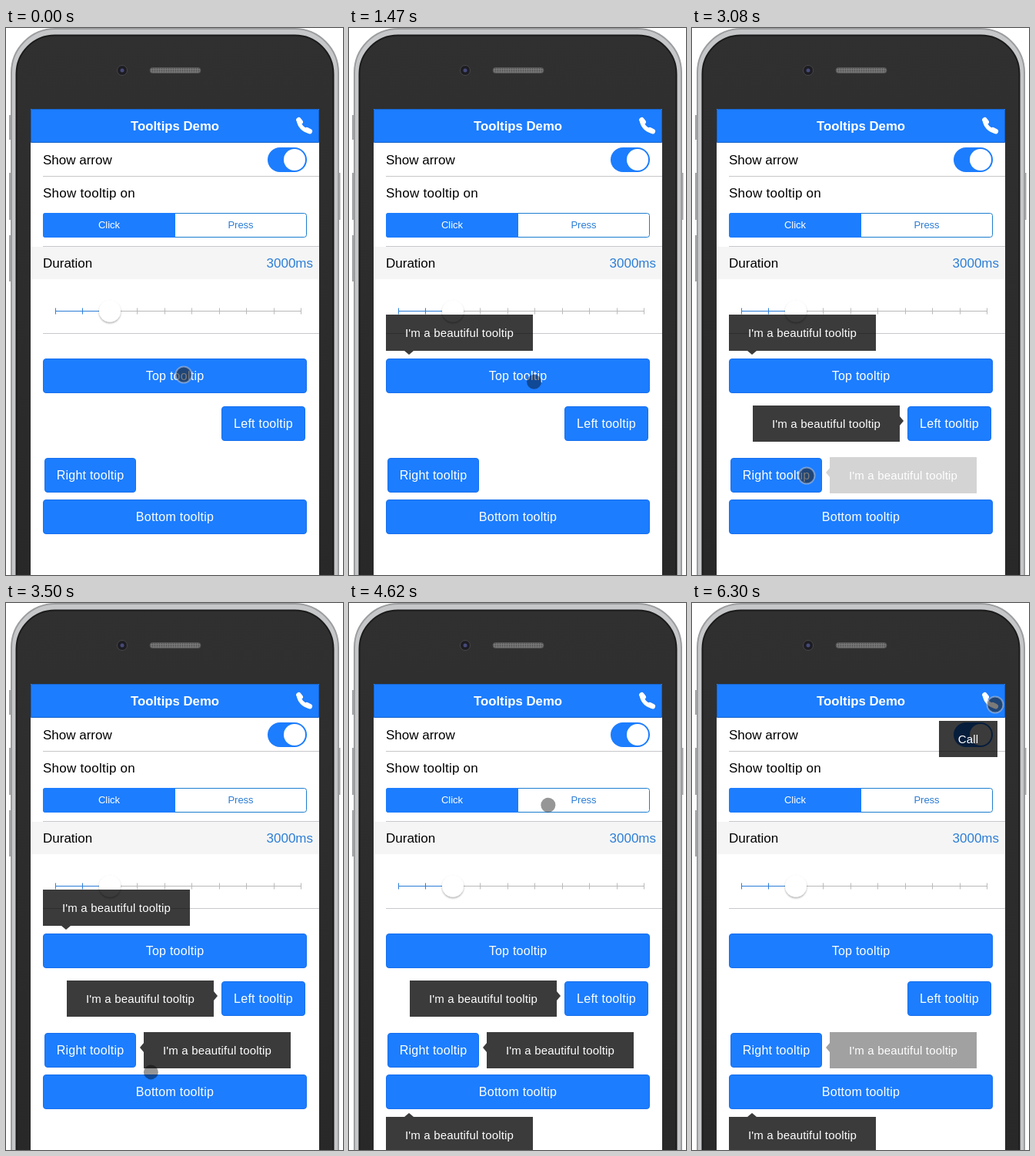
Recreate the animation shown at these times as an HTML page. Size 438 px wide and 710 px high, loop 6.37 s.

```html
<!DOCTYPE html>
<html>
<head>
<meta charset="utf-8">
<style>
html, body { margin: 0; width: 100%; height: 100%; overflow: hidden; background: #fff; }
svg { display: block; font: 17px "Liberation Sans", Arial, sans-serif; }
.mid { text-anchor: middle; fill: #fff; }
.small { font-size: 13px; }
.button { font-size: 16px; letter-spacing: .25px; }
.tip { font-size: 15px; letter-spacing: .18px; }
</style>
</head>
<body>
<svg id="stage" width="438" height="710" viewBox="0 0 438 710">
  <defs>
    <linearGradient id="bezel" x2="0" y2="1">
      <stop offset="0" stop-color="#303030"/><stop offset="1" stop-color="#272727"/>
    </linearGradient>
    <pattern id="mesh" width="3" height="3" patternUnits="userSpaceOnUse">
      <rect width="3" height="3" fill="#777"/><circle cx="1.5" cy="1.5" r=".9" fill="#505050"/>
    </pattern>
    <filter id="shadow" x="-50%" y="-50%" width="200%" height="200%">
      <feDropShadow dx="0" dy="1.5" stdDeviation="1.2" flood-opacity=".35"/>
    </filter>
  </defs>

  <!-- phone -->
  <path d="M5.5 113v32M5.5 188v61M5.5 269v60M433 188v61" stroke="#a5a6a8" stroke-width="3"/>
  <rect x="7" y="1" width="425" height="800" rx="57" fill="#c6c7c9" stroke="#9c9d9f" stroke-width="2"/>
  <rect x="13.5" y="9.5" width="412" height="800" rx="50" fill="url(#bezel)" stroke="#1b1b1b" stroke-width="2"/>
  <circle cx="151" cy="55" r="6.5" fill="#1c1c22" stroke="#484848"/>
  <circle cx="151" cy="55" r="2.5" fill="#454a78"/>
  <rect x="187" y="51.5" width="66" height="7" rx="3.5" fill="url(#mesh)" stroke="#555"/>

  <!-- screen -->
  <path d="M32 105h375v605h-375z" fill="#fff"/>
  <path d="M32.5 105.5h374v43h-374z" fill="#1c7dff" stroke="#1762c6"/>
  <text class="mid" x="219.5" y="133" font-weight="bold" font-size="16.75">Tooltips Demo</text>
  <g fill="none" stroke="#fff" stroke-linecap="round">
    <path d="M380 119.5Q382 131 394 134.5" stroke-width="5"/>
    <path d="M380.5 119.2l2.2 2.8M391 132.2l3.8 2" stroke-width="6.5"/>
  </g>

  <text x="48" y="177">Show arrow</text>
  <rect x="340" y="155" width="51" height="32" rx="16" fill="#1c7dff"/>
  <circle cx="375" cy="171" r="14" fill="#fff"/>
  <text x="48" y="220" letter-spacing=".25">Show tooltip on</text>

  <rect x="48.5" y="240.5" width="342" height="31" rx="3" fill="#fff" stroke="#1c7dcf"/>
  <path d="M220 240h-169q-3 0-3 3v26q0 3 3 3h169z" fill="#1c7dff"/>
  <text class="mid small" x="134" y="260">Click</text>
  <text class="small" x="305" y="260" text-anchor="middle" fill="#2b7dd6">Press</text>

  <path d="M32 284h375v42h-375z" fill="#f5f5f5"/>
  <text x="48" y="311">Duration</text>
  <text x="399" y="311" text-anchor="end" fill="#2b7dd6">3000ms</text>
  <path d="M48 192.5h359M48 283.5h359M48 396.5h359" stroke="#c8c7cc"/>
  <g id="slider" fill="none"></g>
  <circle cx="135" cy="367.5" r="14" fill="#fff" filter="url(#shadow)"/>

  <g id="buttons"></g>
  <g id="tips"></g>
  <circle id="cursor" stroke="rgba(175,190,215,.6)"/>
</svg>
<script>
const LOOP = 6370, STEP = 70, FADE = 300, SHOWN = 3130;
const get = id => document.getElementById(id);
const clamp = v => Math.max(0, Math.min(1, v));
const ease = v => v * v * (3 - 2 * v);

for (let i = 0; i < 10; i++) {
  const x = Math.round(64 + i * 35.45) + .5;
  get('slider').innerHTML += `<path d="M${x} 363.5v8${i < 9 ? 'm0 -4h35.45' : ''}" stroke="${i < 2 ? '#2b7dd6' : '#b9b9b9'}"/>`;
}

const buttons = [
  ['Top', 48, 429, 343], ['Left', 280, 491, 109],
  ['Right', 50, 558, 119], ['Bottom', 48, 612, 343]
];
get('buttons').innerHTML = buttons.map(([side, x, y, w]) =>
  `<rect x="${x + .5}" y="${y + .5}" width="${w - 1}" height="44" rx="3.5" fill="#1c7dff" stroke="#1870ee"/>
   <text class="mid button" x="${x + w / 2}" y="${y + 28}">${side} tooltip</text>`).join('');

const message = "I'm a beautiful tooltip";
const tips = [
  { text: message, x: 48, y: 372, w: 191, arrow: 'M72 419h12l-6 5z', start: 1150 },
  { text: message, x: 79, y: 490, w: 191, arrow: 'M270 504v12l5 -6z', start: 2065 },
  { text: message, x: 179, y: 557, w: 191, arrow: 'M179 571v12l-5 -6z', start: 3014 },
  { text: message, x: 48, y: 667, w: 191, arrow: 'M72 667h12l-6 -5z', start: 3900 },
  { text: 'Call', x: 321, y: 153, w: 76, arrow: '', start: 5150 }
];
get('tips').innerHTML = tips.map(({ text, x, y, w, arrow }) =>
  `<g><path d="M${x} ${y}h${w}v47h${-w}z${arrow}" fill="#000" fill-opacity=".77"/>
   <text class="mid tip" x="${x + w / 2}" y="${y + 29}">${text}</text></g>`).join('');
const tipNodes = [...get('tips').children];

// Each move: start, end, from, bend, to
const moves = [
  [0, 980, [231, 450], [231.5, 451.5], [232, 453]],
  [1350, 1950, [232, 453], [273, 483], [315, 514]],
  [2300, 2900, [315, 514], [232, 548], [149, 581]],
  [3200, 3800, [149, 581], [188, 609], [228.5, 636.5]],
  [4150, 5032, [228.5, 636.5], [189, 188], [394, 132]]
];

function draw(t) {
  tips.forEach(({ start }, i) => {
    const age = t - start;
    tipNodes[i].setAttribute('opacity', clamp(age / FADE) * clamp((SHOWN + FADE - age) / FADE));
  });
  const [start, end, from, bend, to] = moves.filter(m => m[0] <= t).pop();
  const s = ease(clamp((t - start) / (end - start)));
  const at = k => (1 - s) ** 2 * from[k] + 2 * s * (1 - s) * bend[k] + s * s * to[k];
  const moving = start > 0 && t < end;
  const look = {
    cx: at(0), cy: at(1), r: moving ? 9.5 : 10.5,
    fill: moving ? 'rgba(0,0,0,.41)' : 'rgba(35,33,30,.6)',
    'stroke-width': moving ? 0 : 2
  };
  for (const name in look) get('cursor').setAttribute(name, look[name]);
}

const begin = performance.now();
function tick() {
  const t = (performance.now() - begin) % LOOP;
  draw(Math.floor(t / STEP) * STEP);
  requestAnimationFrame(tick);
}
tick();
</script>
</body>
</html>
```
